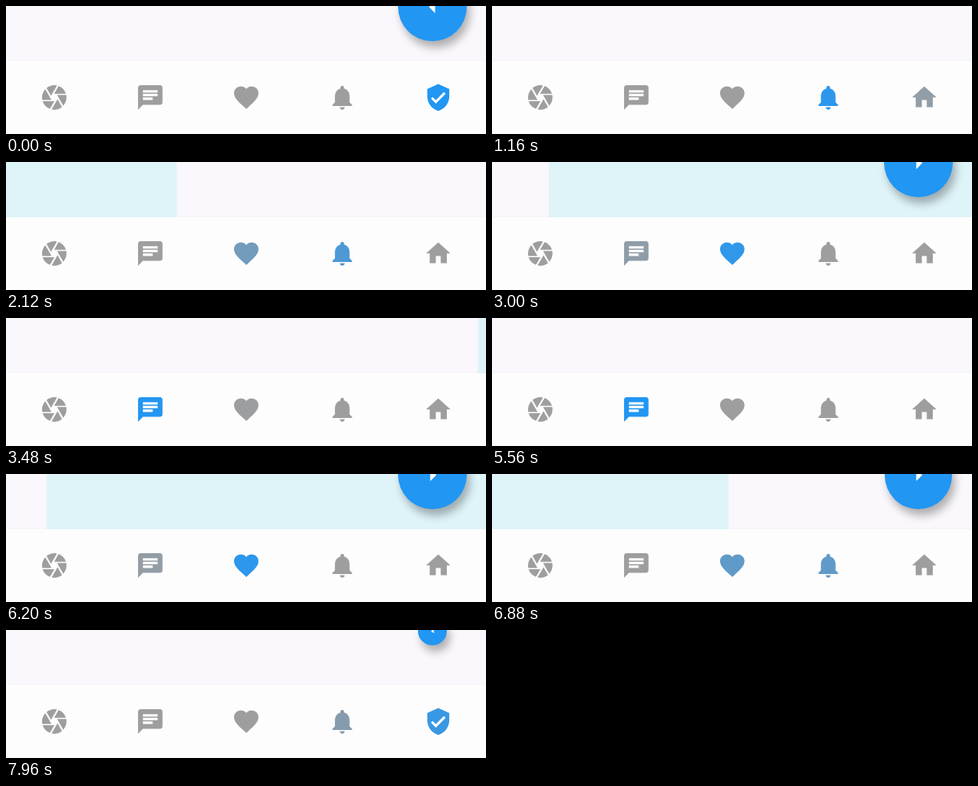
Write an HTML page that moves like this. It is 600 by 160 pixels and loops after 8 s.

```html
<!DOCTYPE html>
<html lang="en">
<head>
<meta charset="utf-8">
<title>Swipe navigation</title>
<style>
  html, body { margin: 0; width: 100%; height: 100%; overflow: hidden; }
  #stage { position: relative; width: 600px; height: 160px; overflow: hidden; background: #faf8fc; }
  #tint { position: absolute; left: 0; top: 0; width: 600px; height: 69px; background: #dff4f9; }
  #nav { position: absolute; left: 0; top: 69px; width: 600px; height: 91px; background: #fefdfe; box-shadow: 0 0 3px rgba(0, 0, 0, .04); }
  svg { position: absolute; width: 36.7px; height: 36.7px; }
  #nav svg { top: 27.1px; }
  #fab { position: absolute; left: 490px; top: -41.6px; width: 86px; height: 86px; }
  #disc { position: absolute; border-radius: 50%; box-shadow: 4px 8px 11px rgba(0, 0, 0, .3); }
  #fab svg { left: 24.65px; top: 24.65px; fill: #fff; }
</style>
</head>
<body>
<div id="stage">
  <div id="tint"></div>
  <div id="fab"><div id="disc"></div><svg viewBox="0 0 24 24"><path/></svg></div>
  <div id="nav"></div>
</div>
<script>
const LOOP = 8000, WIDTH = 600, FAB = 86, FAB_TIME = 200;
const GRAY = [158, 158, 158], BLUE = [33, 150, 243];

const camera = 'M9.4 10.5l4.77-8.26C13.47 2.09 12.75 2 12 2c-2.4 0-4.6.85-6.32 2.25l3.66 6.35.06-.1zM21.54 9c-.92-2.92-3.15-5.26-6-6.34L11.88 9h9.66zm.26 1h-7.49l.29.5 4.76 8.25C20.99 16.97 22 14.61 22 12c0-.69-.07-1.35-.2-2zM8.54 12l-3.9-6.75C3.01 7.03 2 9.39 2 12c0 .69.07 1.35.2 2h7.49l-1.15-2zm-6.08 3c.92 2.92 3.15 5.26 6 6.34L12.12 15H2.46zm11.27 0l-3.9 6.76c.7.15 1.42.24 2.17.24 2.4 0 4.6-.85 6.32-2.25l-3.66-6.35-.93 1.6z';
const chat = 'M20 2H4c-1.1 0-1.99.9-1.99 2L2 22l4-4h14c1.1 0 2-.9 2-2V4c0-1.1-.9-2-2-2zM6 9h12v2H6V9zm8 5H6v-2h8v2zm4-6H6V6h12v2z';
const heart = 'M12 21.35l-1.45-1.32C5.4 15.36 2 12.28 2 8.5 2 5.42 4.42 3 7.5 3c1.74 0 3.41.81 4.5 2.09C13.09 3.81 14.76 3 16.5 3 19.58 3 22 5.42 22 8.5c0 3.78-3.4 6.86-8.55 11.54L12 21.35z';
const bell = 'M12 22c1.1 0 2-.9 2-2h-4c0 1.1.89 2 2 2zm6-6v-5c0-3.07-1.64-5.64-4.5-6.32V4c0-.83-.67-1.5-1.5-1.5s-1.5.67-1.5 1.5v.68C7.63 5.36 6 7.92 6 11v5l-2 2v1h16v-1l-2-2z';
const home = 'M10 20v-6h4v6h5v-8h3L12 3 2 12h3v8z';
const shield = 'M12 1L3 5v6c0 5.55 3.84 10.74 9 12 5.16-1.26 9-6.45 9-12V5l-9-4zm-2 16l-4-4 1.41-1.41L10 14.17l6.59-6.59L18 9l-8 8z';
const tabs = [camera, chat, heart, bell, home];

// Floating buttons by page; pages 1 and 3 have none.
const buttons = {
  0: { color: '#f44336', icon: 'M19 3h-4.18C14.4 1.84 13.3 1 12 1s-2.4.84-2.82 2H5c-1.1 0-2 .9-2 2v14c0 1.1.9 2 2 2h14c1.1 0 2-.9 2-2V5c0-1.1-.9-2-2-2zM14 17H7v-2h7v2zm3-4H7v-2h10v2zm0-4H7V7h10v2z' },
  2: { color: '#2196f3', icon: 'M10 17l5-5-5-5v10z' },
  4: { color: '#2196f3', icon: 'M14 7l-5 5 5 5V7z' }
};

// Each swipe: the moment it passes halfway, and its direction.
const swipes = [
  [960, -1], [2166, -1], [3161, -1], [4260, -1],
  [5110, 1], [6000, 1], [6879, 1], [7843, 1]
];

const $ = s => document.querySelector(s);
const clamp = x => Math.min(1, Math.max(0, x));
const mix = k => `rgb(${GRAY.map((g, i) => Math.round(g + (BLUE[i] - g) * k))})`;

const nav = $('#nav'), tint = $('#tint'), fab = $('#fab'), disc = $('#disc');
const glyph = $('#fab svg'), glyphPath = $('#fab path');

const icons = tabs.map((d, i) => {
  nav.insertAdjacentHTML('beforeend',
    `<svg viewBox="0 0 24 24" style="left:${41.65 + 120 * i}px"><path d="${d}"/></svg>`);
  return nav.lastElementChild.firstElementChild;
});

// Drag in, then settle; dt is measured from the halfway moment.
function progress(dt) {
  return dt < 0
    ? 0.5 * clamp(1 + dt / 420) ** 3
    : 1 - 0.5 * clamp(1 - dt / 560) ** 4;
}

function drawFab(page, last, since) {
  const k = clamp(since / FAB_TIME);
  const entering = page in buttons;
  const button = buttons[entering ? page : last];
  const scale = Math.pow(entering ? k : 1 - k, 1.67);
  const size = FAB * scale;
  fab.style.display = scale > 0.005 ? 'block' : 'none';
  disc.style.width = disc.style.height = size + 'px';
  disc.style.left = disc.style.top = (FAB - size) / 2 + 'px';
  disc.style.background = button.color;
  glyphPath.setAttribute('d', button.icon);
  glyph.style.transform = `scale(${scale}) rotate(${entering ? -45 * (1 - k) : 0}deg)`;
}

function draw(t) {
  let pos = 4, page = 4, last = 4, since = FAB_TIME;
  for (const [mid, dir] of swipes) {
    pos += dir * progress(t - mid);
    if (t >= mid) {
      last = page;
      page += dir;
      since = t - mid;
    }
  }
  tint.style.transform = `translateX(${(2 - pos) * WIDTH}px)`;
  icons.forEach((p, i) => p.setAttribute('fill', mix(clamp(1 - Math.abs(pos - i)))));
  icons[4].setAttribute('d', page === 4 ? shield : home);
  drawFab(page, last, since);
}

const start = performance.now();
function tick() {
  draw((performance.now() - start) % LOOP);
  requestAnimationFrame(tick);
}
tick();
</script>
</body>
</html>
```
